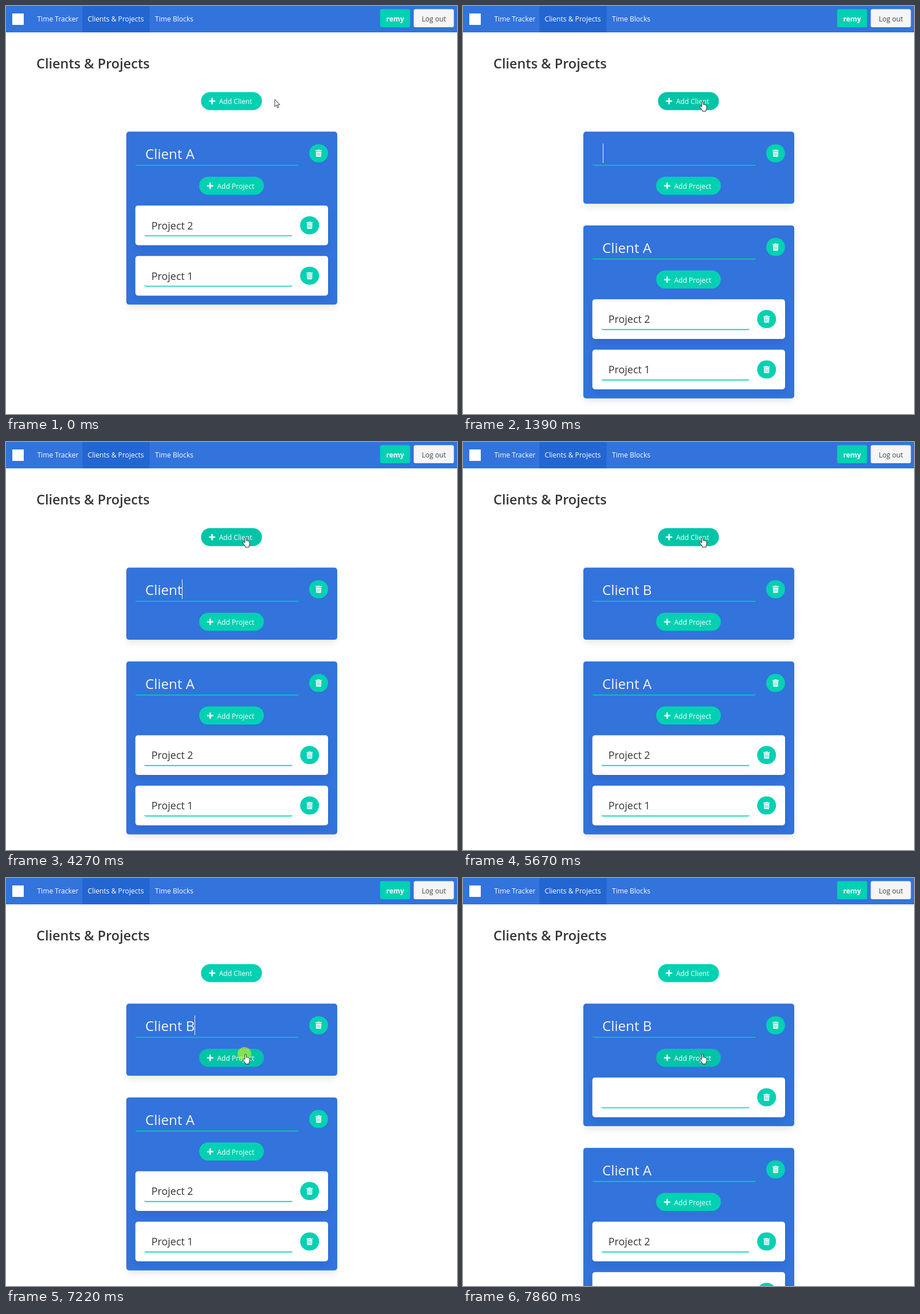
Write an HTML page that moves like this. It is 787 px wide and 712 px high and loops after 8000 ms.

```html
<!DOCTYPE html>
<html lang="en">
<head>
<meta charset="utf-8">
<title>Clients &amp; Projects</title>
<style>
  html, body { margin: 0; width: 100%; height: 100%; overflow: hidden; background: #fff; }
  svg { display: block; width: 787px; height: 712px; font: 12.1px "Open Sans", "Noto Sans", sans-serif; --client: #00d1b2; --project: #00d1b2; }
  text { white-space: pre; }
  .white { fill: #fff; }
  .name { font-size: 24.2px; fill: #f5f5f5; }
  .project { font-size: 17.9px; fill: #363636; }
  .teal { fill: #00d1b2; }
  .blue { fill: #3273dc; }
</style>
</head>
<body>
<svg id="stage" viewBox="0 0 787 712"></svg>
<script>
const LOOP = 8000;
const TEAL = '#00d1b2', HOVER = '#00c4a7', ACTIVE = '#00b89c';
const CARD_TOP = 219.3, EMPTY_CARD = 125.8, PROJECT_PITCH = 88, CARD_GAP = 37.8;

const label = (x, y, text, attrs = 'class="white"') => `<text x="${x}" y="${y}" ${attrs}>${text}</text>`;

const box = (x, y, w, h, cls) => `
  <rect x="${x + 1.6}" y="${y + 7.9}" width="${w - 3.2}" height="${h - 3.2}" rx="4" fill="#0a0a0a" opacity=".1" filter="url(#blur)"/>
  <rect x="${x - .8}" y="${y - .8}" width="${w + 1.6}" height="${h + 1.6}" rx="5.5" fill="#0a0a0a" opacity=".02"/>
  <rect x="${x}" y="${y}" width="${w}" height="${h}" rx="4.7" class="${cls}"/>`;

// Bottom border of a rounded input, tapering at both ends
const underline = (x1, x2, y) => `<path class="teal" d="M${x1} ${y - 3.2}Q${x1} ${y} ${x1 + 3.2} ${y}H${x2 - 3.2}Q${x2} ${y} ${x2} ${y - 3.2}Q${x2} ${y - 1.6} ${x2 - 3.2} ${y - 1.6}H${x1 + 3.2}Q${x1} ${y - 1.6} ${x1} ${y - 3.2}Z"/>`;

const addButton = (x, y, w, text, fill) => `
  <rect x="${x}" y="${y}" width="${w}" height="31.5" rx="15.75" style="fill:${fill}"/>
  <path d="M${x + 14.8} ${y + 15.9}h9M${x + 19.3} ${y + 11.4}v9" stroke="#fff" stroke-width="2.5" stroke-linecap="round"/>
  ${label(x + 31.4, y + 21.2, text)}`;

const trash = (x, y) => `<g transform="translate(${x} ${y})">
  <rect x="-16.5" y="-15.75" width="33" height="31.5" rx="15.75" class="teal"/>
  <path class="white" d="M-5.5-5.4H-2L-1.4-6.3H1.4L2-5.4H5.5V-3.9H-5.5ZM-4.7-3.1H4.7L4.4 5.1Q4.3 6.3 3.2 6.3H-3.2Q-4.3 6.3-4.4 5.1Z"/>
  <path d="M-2.4-1.5V4.7M0-1.5V4.7M2.4-1.5V4.7" stroke="${TEAL}" stroke-width=".8"/></g>`;

const projectRow = (y, name) => box(225.7, y, 336.3, 69.2, 'white') +
  label(253.8, y + 41.6, name, 'class="project"') +
  underline(241.3, 500, y + 53.6) + trash(529.8, y + 34.5);

const card = (id, name, projects, fill) => `<g id="${id}">
  ${box(210, CARD_TOP, 368, EMPTY_CARD + projects.length * PROJECT_PITCH, 'blue')}
  ${label(243, CARD_TOP + 47.7, name, 'class="name"')}
  ${underline(225.7, 511, CARD_TOP + 59.5)}
  ${trash(545.5, CARD_TOP + 37.7)}
  ${addButton(337, CARD_TOP + 78.6, 113, 'Add Project', fill)}
  ${projects.map((p, i) => projectRow(CARD_TOP + 128.9 + i * PROJECT_PITCH, p)).join('')}</g>`;

const stage = document.getElementById('stage');
stage.innerHTML = `
  <defs><filter id="blur" x="-20%" y="-30%" width="140%" height="160%"><feGaussianBlur stdDeviation="6.3"/></filter></defs>
  <rect width="787" height="712" fill="#fff"/>
  <rect width="787" height="46" class="blue"/>
  <rect x="133.5" width="117" height="46" fill="#2366d1"/>
  <rect x="11" y="13" width="20" height="20" class="white"/>
  ${label(54.4, 27, 'Time Tracker')}
  ${label(142.5, 27, 'Clients &amp; Projects')}
  ${label(260, 27, 'Time Blocks')}
  <rect x="652.7" y="5.5" width="52.5" height="31.5" rx="3.1" class="teal"/>
  ${label(679, 27, 'remy', 'class="white" font-weight="700" text-anchor="middle"')}
  <rect x="711.5" y="5.5" width="70" height="31.5" rx="3.1" fill="#f5f5f5"/>
  ${label(746.6, 27, 'Log out', 'fill="#444" text-anchor="middle"')}
  ${label(53, 109, 'Clients &amp; Projects', 'font-size="23.5" font-weight="600" fill="#363636"')}
  ${addButton(340.3, 150.2, 106.3, 'Add Client', 'var(--client)')}
  ${card('oldCard', 'Client A', ['Project 2', 'Project 1'], TEAL)}
  ${card('newCard', '', [], 'var(--project)')}
  ${card('newCardWithProject', '', [''], 'var(--project)')}
  ${label(243, 267, '', 'class="name" id="typed"')}
  <rect id="nameCaret" y="240" width="1" height="34" fill="#f5f5f5"/>
  <rect id="projectCaret" x="255" y="369" width="1" height="26" fill="#363636"/>
  <circle id="click" r="12" fill="#ff0" opacity=".5"/>
  <g id="pointer" fill="#fff" stroke="#1c1c1c" stroke-width=".9" stroke-linejoin="round">
    <path id="arrow" d="M0 0V12.6L2.9 9.9L4.9 14.6L6.9 13.7L4.9 9.2H8.9Z"/>
    <path id="hand" d="M.7 9.8V1.9Q.7.6 1.9.6Q3.2.6 3.2 1.9V6Q4.4 5.2 5.3 6.3Q6.4 5.7 7.3 6.9Q9 6.6 9.2 8.4V12Q9.2 13.8 8 15.2V17.6H1.7V15.8L-2.4 10.9Q-3.3 9.2-2.2 8.7Q-1 8.2.7 9.8Z"/>
  </g>`;

const el = id => document.getElementById(id);
const show = (id, on) => el(id).setAttribute('display', on ? 'inline' : 'none');
const within = (t, spans) => spans.some(([a, b]) => t >= a && t < b);

const FIRST_CLICK = 1300, CARD_ADDED = 1390, SECOND_CLICK = 7220, PROJECT_ADDED = 7310;
const NAME = 'Client B';
const KEY_TIMES = [3260, 3410, 3560, 3640, 3720, 4270, 4420, 5200];
const CARET_X = [244, 259, 265, 271, 285, 299, 307, 314, 329];
const CARET_ON = [[CARD_ADDED, 1930], [2480, 3030], [3260, 4020], [4270, 4570],
  [5120, 5670], [6220, 6760], [SECOND_CLICK, PROJECT_ADDED]];

// Eased progress of a move that is captured in a few discrete steps
function stepped(t, start, end, steps) {
  if (t < start) return 0;
  const gap = (end - start) / (steps - 1);
  const p = Math.min(1, (Math.floor((t - start + 4) / gap) + 1) / steps);
  return p * p * (3 - 2 * p);
}

function render(t) {
  const toClient = stepped(t, 460, 770, 5);
  const toProject = stepped(t, 6140, 6760, 9);
  const x = 469 - 53 * toClient;
  const y = 163 + 3 * toClient + 141 * toProject;
  const overClient = x < 446 && y < 182;
  const overProject = y > 298;
  const clicking = within(t, [[FIRST_CLICK, CARD_ADDED], [SECOND_CLICK, PROJECT_ADDED]]);
  const added = t >= CARD_ADDED, withProject = t >= PROJECT_ADDED;

  stage.style.setProperty('--client', overClient ? (clicking ? ACTIVE : HOVER) : TEAL);
  stage.style.setProperty('--project', overProject ? HOVER : TEAL);

  const shift = added ? EMPTY_CARD + CARD_GAP + (withProject ? PROJECT_PITCH : 0) : 0;
  el('oldCard').setAttribute('transform', `translate(0 ${shift})`);
  show('newCard', added && !withProject);
  show('newCardWithProject', withProject);

  const count = KEY_TIMES.filter(k => t >= k).length;
  el('typed').textContent = NAME.slice(0, count);
  el('nameCaret').setAttribute('x', CARET_X[count]);
  show('nameCaret', within(t, CARET_ON));
  show('projectCaret', withProject && t < 7860);

  el('click').setAttribute('transform', `translate(${x} ${y})`);
  show('click', clicking);
  el('pointer').setAttribute('transform', `translate(${x} ${y})`);
  show('hand', overClient || overProject);
  show('arrow', !overClient && !overProject);
}

const began = performance.now();
function tick() {
  render((performance.now() - began) % LOOP);
  requestAnimationFrame(tick);
}
tick();
</script>
</body>
</html>
```
